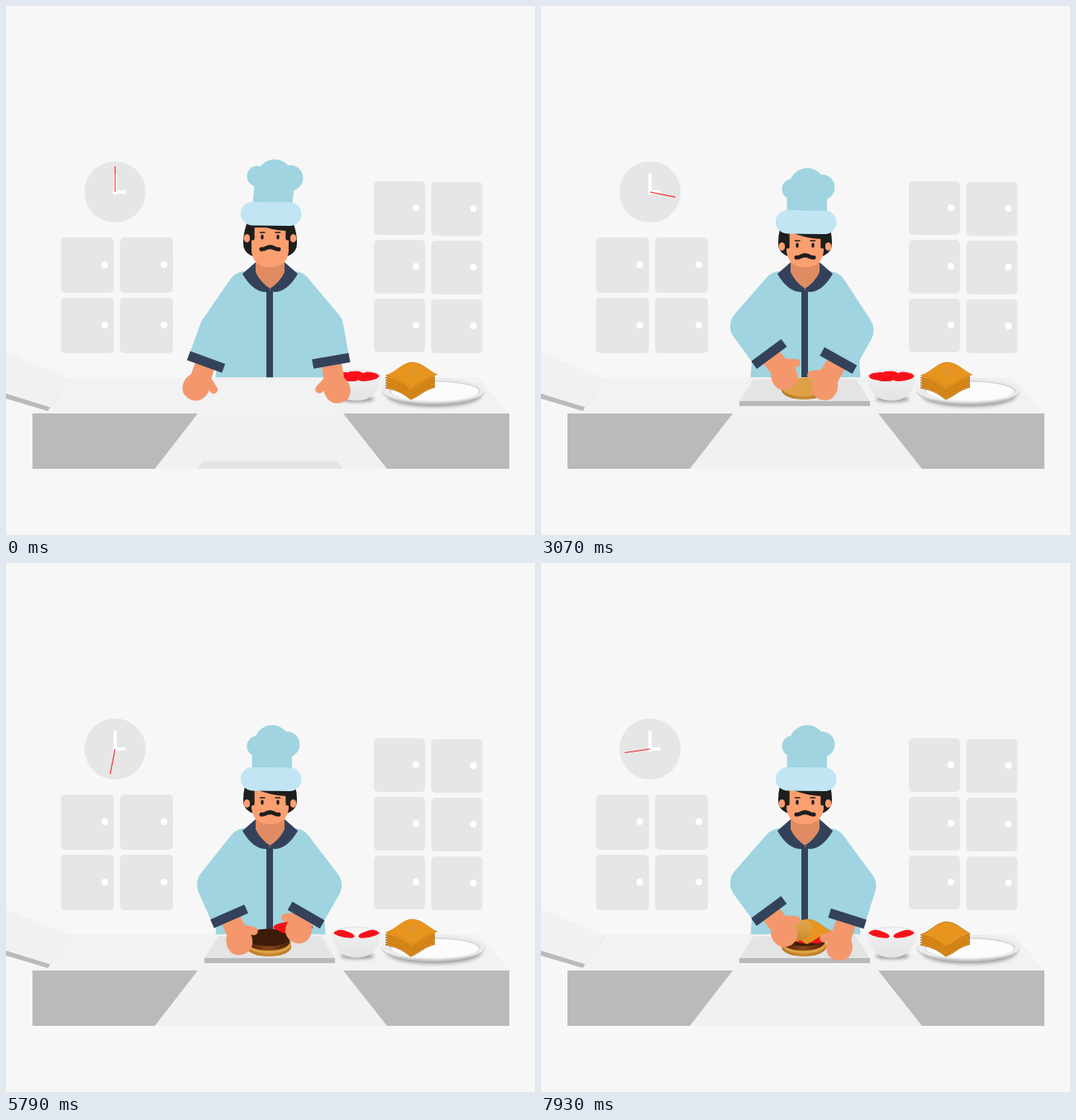
These frames come from a looping animation (640x640 px, 8 s). An HTML page with a canvas:

```html
<!DOCTYPE html>
<html lang="en">
<head>
<meta charset="utf-8">
<title>Chef at work</title>
<style>
html, body { margin: 0; width: 100%; height: 100%; overflow: hidden; background: #f7f7f7; }
canvas { display: block; width: 100%; height: 100%; }
</style>
</head>
<body>
<canvas id="stage" width="640" height="640"></canvas>
<script>
const ctx = document.getElementById('stage').getContext('2d');
const LOOP = 8000;
const RAD = Math.PI / 180;
const GREY = '#e6e6e6', EDGE = '#bababa', WHITE = '#ffffff';
const BLUE = '#9fd4e0', PALE = '#c1e5f3', NAVY = '#33425a';
const SKIN = '#f4976c', FACE = '#fc9f70', NECK = '#e08b62', BLACK = '#1e1e1c';
const CHEESE = '#e8951f', TOMATO = '#f8121c';
const COUNTER_Y = 449.5, MID = 319.5, PIVOT_Y = 628;

// ---------- timing ----------
const clamp = u => Math.min(1, Math.max(0, u));
const ease = u => u < 0.5 ? 2 * u * u : 1 - 2 * (1 - u) * (1 - u);
const mix = (a, b, u) => a + (b - a) * u;
const phase = (t, from, to) => ease(clamp((t - from) / (to - from)));
// Rises from a to b, falls from c to d.
const pulse = (t, a, b, c, d) => phase(t, a, b) - phase(t, c, d);

// A point that makes successive eased moves: {from, to, at: [x, y]}
const travel = (t, start, moves) => moves.reduce(
  (p, m) => p.map((v, i) => mix(v, m.at[i], phase(t, m.from, m.to))), start);
const move = (from, to, x, y) => ({ from, to, at: [x, y] });

// ---------- choreography ----------
const REST = [283, 457], FETCH = [218, 446], PLACE = [295, 447];
// Things that slide in from the left and are then lifted onto the board
const bun = { slide: 1080, grab: 1850, drop: 2500, spot: [318, 461] };
const patty = { slide: 3100, grab: 4200, drop: 4900, spot: [317.5, 453] };
const lid = { slide: 6700, grab: 7420, drop: 7950, spot: [308, 445] };
const deliveries = [bun, patty, lid];
const SCOOP = 5400, LIFT = 6380, LANDED = 7020;

const delivered = (t, d) => travel(t, [-30, 467], [
  move(d.slide, d.slide + 720, 218, 467),
  move(d.grab, d.drop, ...d.spot)
]);
const leftHand = t => travel(t, [231, 461], [
  move(0, 750, ...REST),
  ...deliveries.flatMap(d => [
    move(d.grab - 400, d.grab, ...FETCH),
    move(d.grab, d.drop, ...PLACE),
    move(d.drop + 600, d.drop + 900, ...REST)
  ])
]);
const rightHand = t => travel(t, [399, 461], [
  move(0, 750, 344, 457),
  move(4850, 5300, 422, 454),
  move(SCOOP, 5760, 347, 454),
  move(6040, LIFT, 465, 455),
  move(LIFT, LANDED, 361, 461)
]);
const lean = t => 10.4 * pulse(t, 6040, LIFT, LIFT, LANDED);
// While gripping, the right hand draws back under the cuff.
const grip = t => 4 - 16 * (pulse(t, 5000, 5300, 5800, 6040) + pulse(t, 6100, LIFT, 6800, LANDED));

// ---------- drawing helpers ----------
function fillPath(d, color) {
  ctx.fillStyle = color;
  ctx.fill(new Path2D(d));
}
function poly(color, ...p) {
  ctx.beginPath();
  for (let i = 0; i < p.length; i += 2) ctx.lineTo(p[i], p[i + 1]);
  ctx.fillStyle = color;
  ctx.fill();
}
function oval(x, y, rx, ry, color, turn = 0) {
  ctx.beginPath();
  ctx.ellipse(x, y, rx, ry, turn, 0, 7);
  ctx.fillStyle = color;
  ctx.fill();
}
const dot = (x, y, r, color) => oval(x, y, r, r, color);
function box(x, y, w, h, r, color) {
  ctx.beginPath();
  ctx.roundRect(x, y, w, h, r);
  ctx.fillStyle = color;
  ctx.fill();
}
function line(color, width, ...p) {
  ctx.beginPath();
  for (let i = 0; i < p.length; i += 2) ctx.lineTo(p[i], p[i + 1]);
  ctx.strokeStyle = color;
  ctx.lineWidth = width;
  ctx.stroke();
}
function group(draw) {
  ctx.save();
  draw();
  ctx.restore();
}
// Draws in coordinates centred on the body axis, once per side.
function bothSides(draw) {
  for (const side of [-1, 1]) group(() => {
    ctx.translate(MID, 0);
    ctx.scale(side, 1);
    draw();
  });
}
function shadow(x, y, rx, ry, alpha) {
  group(() => {
    ctx.filter = 'blur(2px)';
    oval(x, y, rx, ry, `rgba(0,0,0,${alpha})`);
  });
}
function gradient(x0, y0, x1, y1, ...colors) {
  const g = ctx.createLinearGradient(x0, y0, x1, y1);
  colors.forEach((c, i) => g.addColorStop(i / (colors.length - 1), c));
  return g;
}

// ---------- kitchen ----------
function cupboards(x, y, rows, w, h, drop) {
  for (let i = 0; i < rows * 2; i++) {
    const col = i % 2;
    const left = x + col * (w + 7.5), top = y + (i >> 1) * (h + 6) + col * drop;
    box(left, top, w, h, 5, GREY);
    dot(left + w - 11, top + h / 2 - 0.5, 4, WHITE);
  }
}
function room(t) {
  ctx.fillStyle = '#f7f7f7';
  ctx.fillRect(0, 0, 640, 640);
  cupboards(66.5, 280, 2, 64, 67, 0);
  cupboards(445, 212, 3, 62, 65, 1);
  dot(132, 225, 37, GREY);
  line(WHITE, 4, 132, 203, 132, 225, 144.5, 225);
  dot(132, 225.5, 3, WHITE);
  const a = t * 0.033 * RAD;
  line('#f5222a', 1.1, 132, 225, 132 + 31 * Math.sin(a), 225 - 31 * Math.cos(a));
}
function counter() {
  poly('#f2f2f2', 78, COUNTER_Y, 572, COUNTER_Y, 609, 493, 32, 493, 51, 488);
  poly('#f1f1f1', 0, 419, 78, 451, 52, 488, 0, 470);
  poly(EDGE, 0, 469, 53.5, 485.5, 50.5, 490, 0, 475);
  line(GREY, 0.8, 78, 451, 53, 486);
  box(32, 493, 577, 67, 0, EDGE);
  poly('#f1f1f1', 232, 493, 408, 493, 461, 560, 180, 560);
}
function board(t) {
  const u = phase(t, 0, 800);
  const s = mix(1.325, 1, u);
  group(() => {
    ctx.beginPath();
    ctx.rect(0, 0, 640, 560);
    ctx.clip();
    ctx.translate(319, mix(551, 451.5, u));
    ctx.scale(s, s);
    poly('#e4e4e4', -61.5, 0, 62, 0, 79, 26.5, -79, 26.5);
    box(-79, 26.5, 158, 6, 0, '#b9b9b9');
  });
}

// ---------- food ----------
function tomato(x, y, rx, ry, turn) {
  oval(x, y, rx, ry, TOMATO, turn);
  line('#d5060f', 0.6, x - rx / 2, y + 1.5, x + rx / 2, y - 0.5);
}
function heap(x, y, count, rx, ry) {
  for (let i = 0; i < count; i++) {
    const a = i * 2.4;
    tomato(x + rx * Math.cos(a), y + ry * Math.sin(a), 11, 4.5, 0.3 * Math.sin(a * 3));
  }
}
function bowl(t) {
  shadow(425, 475.5, 20, 3.5, 0.4);
  fillPath('M395 447 C395 468 408 477.5 424 477.5 C440 477.5 453 468 453 447Z',
    gradient(0, 446, 0, 478, '#f0f0f0', '#e3e3e3'));
  oval(424, 447.5, 29, 7.5, '#e0e0e0');
  oval(424, 447.7, 27.8, 6.6, '#f5f5f5');
  group(() => {
    ctx.beginPath();
    ctx.ellipse(424, 448, 27.5, 6.3, 0, 0, 7);
    ctx.clip();
    for (const side of [-1, 1]) tomato(424 + side * 16, 448.5, 14, 4.2, -0.25 * side);
    if (t < SCOOP) heap(424, 448, 7, 16, 2);
  });
}
function slice(x, y, color, rim) {
  group(() => {
    ctx.translate(x, y);
    const d = new Path2D('M-31 1 C-18 -3 -12 -14 1 -15 C14 -14 20 -5 31 0 C16 3 10 12 0 15 C-8 9 -14 4 -31 1Z');
    ctx.fillStyle = color;
    ctx.fill(d);
    ctx.strokeStyle = rim;
    ctx.lineWidth = 0.8;
    ctx.stroke(d);
  });
}
function topSlice(x, y) {
  slice(x, y, CHEESE, '#d5841a');
  oval(x + 1, y - 2.5, 5.5, 4, '#df952e');
}
function plate(t) {
  shadow(518, 471, 57, 14, 0.35);
  oval(517, 466, 63, 16, '#c9c9c9');
  oval(517, 464.7, 63, 15, '#ececec');
  oval(519, 465.5, 55, 12.5, '#d8d8d8');
  oval(519, 466.3, 53, 11.5, '#fcfcfc');
  group(() => {
    ctx.beginPath();
    ctx.rect(459, 425, 60, 60);
    ctx.clip();
    for (let i = 5; i > 0; i--) slice(489.5, 446 + i * 3, i > 1 ? '#de8d19' : CHEESE, '#b06c12');
  });
  if (t < LIFT) topSlice(490.5, 446);
}
function disc(x, y, rx, ry, depth, top, dark, light) {
  const g = gradient(x - rx, 0, x + rx, 0, dark, light, dark);
  oval(x, y + depth, rx, ry, g);
  box(x - rx, y, 2 * rx, depth, 0, g);
  oval(x, y, rx, ry, top);
}
function food(t) {
  disc(...delivered(t, bun), 27, 11.5, 3.5, '#dea145', '#b87828', '#c98a32');
  disc(...delivered(t, patty), 25.8, 10.5, 5.5, '#3d1c09', '#4a2009', '#88461c');
  if (t > SCOOP) {
    heap(...travel(t, [424, 447], [move(SCOOP, 5760, 348, 440), move(5760, 6000, 323, 452)]), 6, 13, 4.5);
  }
  if (t > LIFT) topSlice(...travel(t, [490.5, 446], [move(LIFT, LANDED, 321, 446)]));
  const [x, y] = delivered(t, lid);
  oval(x, y, 21, 13, gradient(x, y - 13, x, y + 13, '#dfa54c', '#d99b40', '#c5822b'), -0.22);
}

// ---------- chef ----------
function torso() {
  poly(BLUE, 282, 326, 356, 326, 383, 400, 388, 470, 252, 470, 257, 405);
  box(315, 340, 8, 130, 0, NAVY);
}
function collar() {
  bothSides(() => {
    poly(NECK, -0.5, 305, 17.5, 305, 17.5, 326, 0, 344);
    fillPath('M17.5 310 L33.5 324 Q21 346 4.5 346 L-0.2 342 Q12 334 17.5 322Z', NAVY);
  });
}
function head(t) {
  const down = phase(t, 900, 1300);
  bothSides(() => fillPath('M-1 262 L28 262 Q34 280 32 292 Q29 301 19 303 L-1 303Z', BLACK));
  bothSides(() => fillPath('M-1 268 L22.5 268 L22.5 297 Q20 316 0 316 L-1 316Z', FACE));
  group(() => {
    ctx.translate(0, 10 * down);
    ctx.lineCap = 'round';
    fillPath('M300 258 L345 258 L339 272 Q320 271 303 264Z', BLACK);
    bothSides(() => {
      oval(28, 281, 3.8, 5, FACE);
      box(18.8, 258, 5.6, 25.5, 2.5, BLACK);
      line(BLACK, 1.5, 6.5, 274.1, 12, 274.1);
      oval(9.5, 279.5, 1.7, 3, BLACK);
    });
    const smile = pulse(t, 3850, 4050, 4450, 4650);
    oval(MID, 295, 6, 3.8 * smile, '#e8323c');
    oval(MID, 296, 5, 1.8 * smile, WHITE);
    bothSides(() => {
      ctx.strokeStyle = BLACK;
      ctx.lineWidth = 5;
      ctx.stroke(new Path2D('M0 291.8 Q3 291.5 5 293 Q7 294.3 10.5 294.3'));
    });
  });
  hat(down);
}
function hat(down) {
  const m = (a, b) => mix(a, b, down);
  poly(BLUE, m(301, 297.5), m(212, 225), m(349, 346), m(214, 225), m(346, 346), m(245, 255), 297.7, m(245, 255));
  dot(304, m(206, 221.5), 12.5, BLUE);
  dot(m(325, 322), m(207, 217.5), 21.5, BLUE);
  dot(m(344, 340), m(208, 219.5), 15.4, BLUE);
  group(() => {
    ctx.translate(320.7, 251.5 + 10 * down);
    ctx.rotate(0.014);
    box(-36.8, -14.2, 73.6, 28.4, 14.2, PALE);
  });
}

// ---------- arms ----------
const UPPER = 59, LOWER = 74, WRIST = 36;
// Two-bone arm: side is -1 for the arm on the left, 1 for the one on the right.
function solveArm(angle, side, [hx, hy]) {
  const s = Math.sin(angle), c = Math.cos(angle), dy = 343 - PIVOT_Y;
  const sx = 319 + side * 29 * c - dy * s, sy = PIVOT_Y + side * 29 * s + dy * c;
  const dist = Math.min(Math.hypot(hx - sx, hy - sy), UPPER + LOWER);
  const ux = (hx - sx) / dist, uy = (hy - sy) / dist;
  const along = (UPPER ** 2 - LOWER ** 2 + dist ** 2) / (2 * dist);
  const out = side * Math.sqrt(Math.max(0, UPPER ** 2 - along ** 2));
  const ex = sx + along * ux + out * uy, ey = sy + along * uy - out * ux;
  return { sx, sy, ex, ey, side, turn: Math.atan2(hx - ex, hy - ey) };
}
function sleeve({ sx, sy, ex, ey, turn }) {
  ctx.lineJoin = 'round';
  line(BLUE, 44.5, sx, sy, ex, ey, ex + WRIST * Math.sin(turn), ey + WRIST * Math.cos(turn));
  dot(sx, sy, 22.2, BLUE);
}
function forearm({ ex, ey, side, turn }, reach) {
  group(() => {
    ctx.translate(ex, ey);
    ctx.rotate(-turn);
    ctx.translate(0, WRIST);
    ctx.scale(-side, 1);
    group(() => {
      ctx.translate(0, reach);
      ctx.lineCap = 'round';
      const top = 4 - reach;
      fillPath(`M-12 ${top} L12 ${top} L13 26 Q16 32 15 39 Q12 54 -2 54 Q-17 52 -17 38 Q-17 31 -12 25Z`, SKIN);
      line(SKIN, 10, 8, 24, 20, 33);
    });
    box(-22.5, 0, 45, 11.5, 0, NAVY);
  });
}

function render(t) {
  const angle = lean(t) * RAD;
  const left = solveArm(angle, -1, leftHand(t));
  const right = solveArm(angle, 1, rightHand(t));
  const tilted = draw => group(() => {
    ctx.translate(319, PIVOT_Y);
    ctx.rotate(angle);
    ctx.translate(-319, -PIVOT_Y);
    draw();
  });
  room(t);
  group(() => {
    ctx.beginPath();
    ctx.rect(0, 0, 640, COUNTER_Y);
    ctx.clip();
    tilted(torso);
    sleeve(left);
    sleeve(right);
    tilted(() => { collar(); head(t); });
  });
  counter();
  board(t);
  plate(t);
  bowl(t);
  food(t);
  forearm(left, 1);
  forearm(right, grip(t));
}

function frame() {
  render(performance.now() % LOOP);
  requestAnimationFrame(frame);
}
frame();
</script>
</body>
</html>
```
